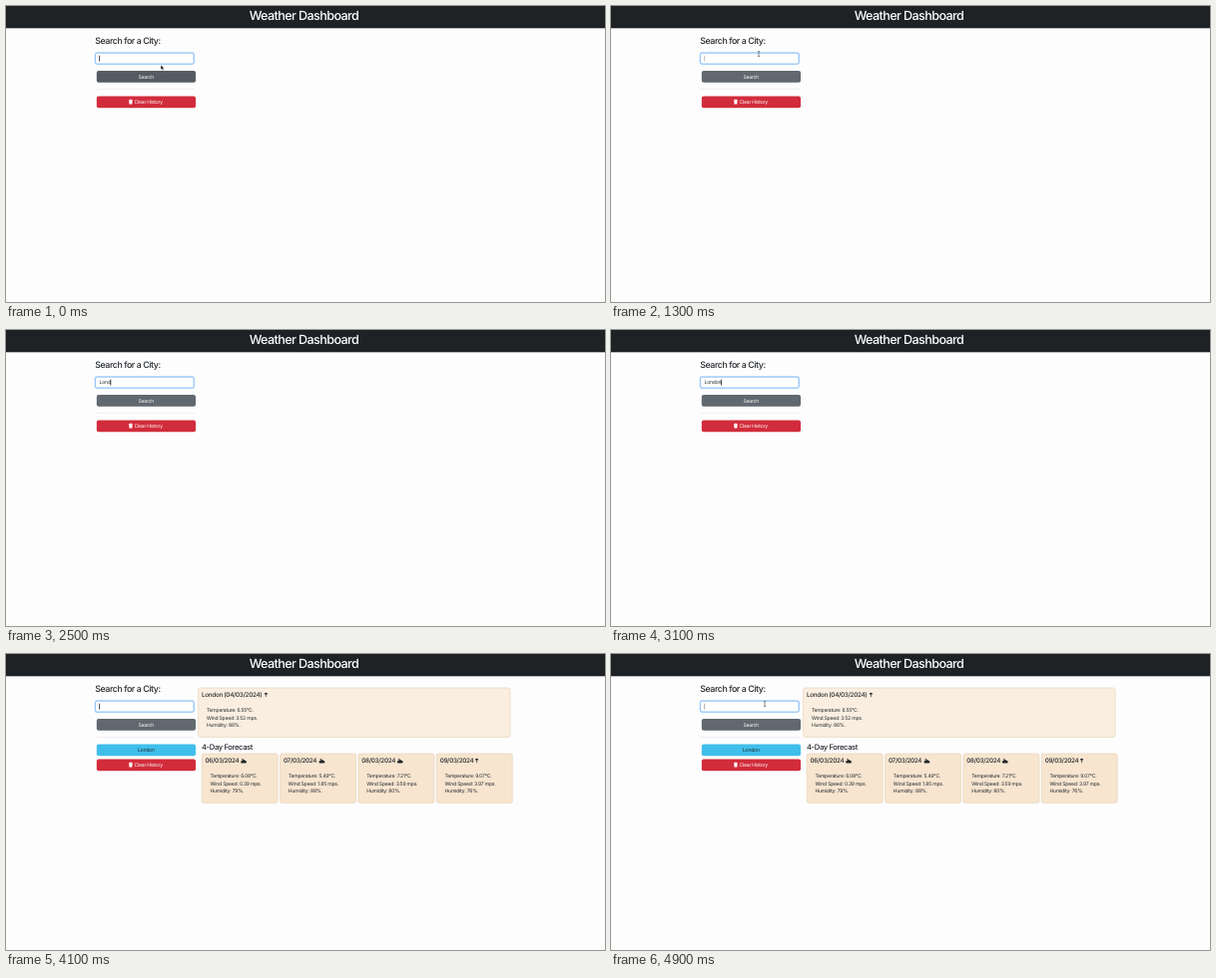
Recreate the animation shown at these times as an HTML page. Size 600 px wide and 297 px high, loop 5 s.

```html
<!DOCTYPE html>
<html lang="en">
<head>
<meta charset="utf-8">
<title>Weather Dashboard</title>
<style>
html, body { margin: 0; width: 100%; height: 100%; overflow: hidden; background: #fdfdfe; }
svg { display: block; width: 600px; height: 297px; }
text {
  font-family: Inter, Roboto, "Liberation Sans", sans-serif;
  font-size: 5.05px; letter-spacing: -0.04em; fill: #24282c;
  text-rendering: geometricPrecision; white-space: pre;
}
.h1 { font-size: 12.6px; font-weight: 500; letter-spacing: -0.048em; fill: #fff; text-anchor: middle; }
.h3 { font-size: 8.83px; font-weight: 500; letter-spacing: -0.048em; }
.h4 { font-size: 7.57px; font-weight: 500; letter-spacing: -0.045em; }
.h5 { font-size: 6.3px; font-weight: 500; letter-spacing: -0.045em; }
.mid { text-anchor: middle; }
.white { fill: #fff; }
</style>
</head>
<body>
<svg id="stage" viewBox="0 0 600 297"></svg>
<script>
const LOOP = 5000, STEP = 100, RESULTS = 4100;
const stage = document.getElementById("stage");

function add(parent, tag, attrs) {
  const el = document.createElementNS("http://www.w3.org/2000/svg", tag);
  for (const key in attrs) el.setAttribute(key, attrs[key]);
  parent.appendChild(el);
  return el;
}
const group = (parent) => add(parent, "g", {});
const box = (parent, x, y, width, height, fill, rx = 0, more = {}) =>
  add(parent, "rect", { x, y, width, height, fill, rx, ...more });
const path = (parent, d, more) => add(parent, "path", { d, ...more });

function label(parent, str, x, y, cls = "") {
  const el = add(parent, "text", { x, y, class: cls });
  el.textContent = str;
  return el;
}

function drawCloud(parent, x, y) {
  const g = add(parent, "g", { transform: `translate(${x} ${y})`, fill: "#25282b" });
  path(g, "M1.3 5.1a1.25 1.25 0 0 1-.1-2.5a1.7 1.7 0 0 1 3.1-.1a1.3 1.3 0 0 1 .3 2.6z");
  path(g, "M.8 1.9A1.5 1.5 0 0 1 2.1.3A1.6 1.6 0 0 0 3 1.1A2.3 2.3 0 0 0 .8 1.9z");
}

function drawRain(parent, x, y) {
  const g = add(parent, "g", { transform: `translate(${x} ${y})` });
  path(g, "M0 2A1.7 1.7 0 0 1 3.4 2z", { fill: "#25282b" });
  path(g, "M1.7 2V4.6", { stroke: "#25282b", "stroke-width": 0.7, fill: "none" });
}

function drawCard(parent, card) {
  const { x, y, w, fill, title, icon, temp, wind, hum } = card;
  box(parent, x, y, w, 49.4, fill, 2, { stroke: "#e5cfb1", "stroke-width": 0.6 });
  label(parent, title, x + 3.4, y + 9.2, "h5");
  (icon === "rain" ? drawRain : drawCloud)(parent, card.iconX, y + 4.5);
  [`Temperature: ${temp}°C.`, `Wind Speed: ${wind} mps.`, `Humidity: ${hum}%.`]
    .forEach((line, i) => label(parent, line, x + 8.3, y + 23.9 + i * 7.7));
}

// Page frame and search form
box(stage, 0, 0, 600, 297, "#fdfdfe");
box(stage, 0, 0, 600, 22.3, "#1e2225");
label(stage, "Weather Dashboard", 298.5, 14.3, "h1");
label(stage, "Search for a City:", 89.2, 38.4, "h3");
box(stage, 88.6, 46.2, 100.4, 12.8, "#bcdcfb", 2.4);
box(stage, 89.6, 47.2, 98.4, 10.8, "#fff", 1.7, { stroke: "#74b2f3", "stroke-width": 0.7 });
const field = label(stage, "", 93.5, 54.4);
const caret = box(stage, 93.3, 49.7, 0.8, 5.8, "#15181a");
const search = box(stage, 90.8, 65, 99.2, 11.8, "#61686f", 2);
label(stage, "Search", 140.3, 72.8, "mid white");
box(stage, 89.3, 83.2, 99.5, 0.4, "#dcdde0");

// History and clear button
const history = group(stage);
box(history, 90.8, 90.4, 99.2, 11.8, "#3fbeea", 2);
label(history, "London", 140.3, 98.2, "mid");
const clear = group(stage);
box(clear, 90.8, 90.4, 99.2, 11.8, "#d12c3b", 2);
path(clear, "M122.9 94.1h1.2l.3-.5h1l.3.5h1.2v.6h-4zM123.2 95h3.4l-.3 3.6h-2.8z", { fill: "#fff" });
label(clear, "Clear History", 128.5, 98.2, "white");

// Weather results
const results = group(stage);
drawCard(results, {
  x: 192.6, y: 34, w: 312.4, fill: "#faeee0", title: "London (04/03/2024)",
  icon: "rain", iconX: 258.7, temp: "6.55", wind: "3.52", hum: 86
});
label(results, "4-Day Forecast", 196, 95.8, "h4");
[
  ["6.08", "0.39", 79, "cloud"],
  ["5.49", "1.85", 88, "cloud"],
  ["7.21", "3.59", 80, "cloud"],
  ["9.07", "3.97", 76, "rain"]
].forEach(([temp, wind, hum, icon], i) => {
  const x = 196.2 + i * 78.35;
  drawCard(results, {
    x, y: 100, w: 76, fill: "#f7e5d0", title: `0${6 + i}/03/2024`,
    icon, iconX: x + (icon === "rain" ? 38.6 : 39), temp, wind, hum
  });
});

// Mouse pointers, drawn around their hot spot
const arrow = path(stage, "M0 0V5.1L1.2 4.1L2 5.9L2.9 5.5L2.1 3.8H3.7z",
  { fill: "#111", stroke: "#fff", "stroke-width": 0.45 });
const beam = path(stage, "M-1-2.6Q0-2.6 0-2V2Q0 2.6-1 2.6M1-2.6Q0-2.6 0-2M0 2Q0 2.6 1 2.6",
  { fill: "none", stroke: "#33373a", "stroke-width": 0.6 });

// Each move is a run of [time, x, y] points
const moves = [
  [[0, 155, 59], [100, 172, 38], [200, 218, 14], [300, 263, 38], [400, 222, 93],
    [500, 178, 85], [700, 178, 85], [900, 163, 76], [1100, 151, 62], [1300, 148, 48], [1400, 147.5, 38]],
  [[4500, 285, 132], [4600, 247, 101], [4700, 205, 70], [4800, 168, 51], [4900, 154, 50]]
];

// Caret opacity over time; hard jumps share a time
const blink = [[0, 1], [300, 0], [350, 0], [500, 1], [750, 1], [1000, 0], [1200, 0], [1500, 1],
  [3500, 1], [3800, 0], [3999, 0], [4000, 1], [4450, 1], [4700, 0], [4800, 0], [5000, 0.9]];

const typing = [[1800, 1], [2300, 2], [2500, 4], [2900, 5], [3100, 6], [4000, 0]];

function sample(keys, t) {
  const i = keys.findIndex((k) => k[0] >= t);
  if (i < 0 || (i === 0 && keys[0][0] > t)) return null;
  if (i === 0) return keys[0].slice(1);
  const a = keys[i - 1], b = keys[i], f = (t - a[0]) / (b[0] - a[0]);
  return a.slice(1).map((v, n) => v + (b[n + 1] - v) * f);
}

const pointer = (t) => sample(moves[0], t) || sample(moves[1], t);
const show = (el, on) => el.setAttribute("visibility", on ? "visible" : "hidden");
const overSearch = (p) => p && p[0] > 91 && p[0] < 190 && p[1] > 65 && p[1] < 77;

let shown = -1;

function draw(t) {
  const done = t >= RESULTS;
  show(results, done);
  show(history, done);
  clear.setAttribute("transform", `translate(0 ${done ? 15 : 0})`);

  const count = typing.reduce((n, [at, size]) => (t >= at ? size : n), 0);
  field.textContent = "London".slice(0, count);
  caret.setAttribute("x", 93.3 + (count ? field.getComputedTextLength() : 0));
  caret.setAttribute("opacity", sample(blink, t)[0]);

  const p = pointer(t);
  const dark = t < STEP || overSearch(p) || overSearch(pointer(t - STEP));
  search.setAttribute("fill", dark ? "#555b62" : "#61686f");

  const inField = p && p[0] < 189 && p[1] > 46.5 && p[1] < 58.5;
  const onHeading = p && p[0] < 155 && p[1] > 31 && p[1] < 41;
  const isBeam = inField || onHeading;
  show(beam, p && isBeam);
  show(arrow, p && !isBeam);
  if (p) (isBeam ? beam : arrow).setAttribute("transform", `translate(${p[0]} ${p[1]})`);
}

const start = performance.now();
function tick() {
  const t = Math.floor(((performance.now() - start) % LOOP) / STEP) * STEP;
  if (t !== shown) draw(shown = t);
  requestAnimationFrame(tick);
}
tick();
</script>
</body>
</html>
```
